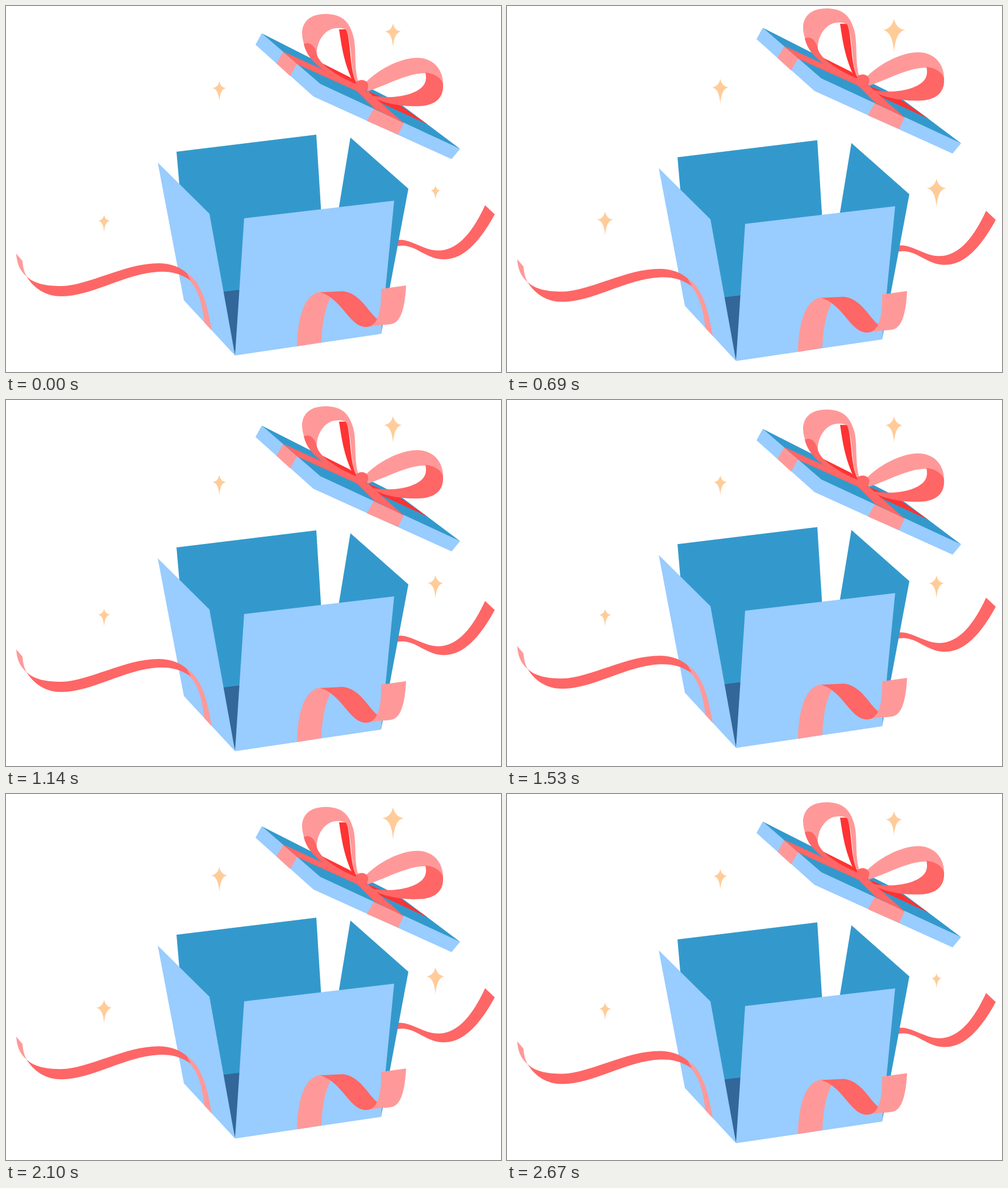
An HTML page with a canvas that plays this animation: 871 by 643 pixels, repeating every 2.7 s.

```html
<!DOCTYPE html>
<html lang="en">
<head>
<meta charset="utf-8">
<title>Gift box</title>
<style>
  html, body { margin: 0; width: 100%; height: 100%; overflow: hidden; background: #fff; }
  canvas { display: block; }
</style>
</head>
<body>
<canvas id="stage" width="871" height="643"></canvas>
<script>
const ctx = document.getElementById('stage').getContext('2d');
const LOOP = 2700;
const SWING = 10;
const SKY = '#99ccff', BLUE = '#3399cc', NAVY = '#336699';
const PINK = '#ff9999', CORAL = '#ff6666', RED = '#ff3333', GOLD = '#ffcc99';

const shape = (color, d) => ({ color, path: new Path2D(d) });

const box = [
  // right streamer, behind the box
  shape(CORAL, 'M685 412C700 408 712 415 735 424C785 445 818 404 843 350L860 366C825 430 795 446 768 445C740 444 722 421 697 421L685 422Z'),
  // back, right side and floor
  shape(BLUE, 'M300 256L546 226L562 480L415 499L322 510Z'),
  shape(BLUE, 'M606 231L708 321L660 576L570 450Z'),
  shape(NAVY, 'M374 503L415 498L403 614Z'),
  // left side and front
  shape(SKY, 'M267 275L358 365L403 614L313 517Z'),
  shape(SKY, 'M419 373L683 342L660 576L403 614Z'),
  // left streamer
  shape(PINK, 'M18 435L29 448C30 460 32 468 37 476C24 465 19 452 18 435Z'),
  shape(PINK, 'M312 466C340 478 353 515 362 570L349 556C346 528 339 496 321 480Z'),
  shape(CORAL, 'M36 475C50 488 70 492 98 492C145 491 210 452 268 452C290 452 307 459 318 469L325 482C306 470 290 466 268 467C210 470 150 510 98 510C70 510 50 497 36 475Z'),
  // front curl
  shape(PINK, 'M512 598C513 545 526 503 556 502L574 508C562 525 556 558 555 591Z'),
  shape(PINK, 'M660 497L704 491C702 530 695 553 681 558C670 561 655 559 636 564C655 560 661 535 660 497Z'),
  shape(CORAL, 'M553 503L592 501C622 503 637 537 653 550C648 560 641 564 633 564C604 563 592 515 553 503Z')
];

const lid = [
  shape(SKY, 'M450 48L439 68L541 159L784 269L799 251L553 137Z'),
  shape(PINK, 'M488 80L476 101L500 123L512 102Z'),
  shape(PINK, 'M648 179L635 202L690 226L700 205Z'),
  shape(BLUE, 'M450 48L691 170L799 251L553 137Z'),
  // bands across the top
  shape(RED, 'M553 99L605 125L637 152L618 148Z'),
  shape(RED, 'M640 151L691 173L742 208L640 161Z'),
  shape(CORAL, 'M488 80L630 145L625 153L512 102Z'),
  shape(CORAL, 'M648 180L700 206L637 150L617 149Z'),
  // right loop
  shape(PINK, 'M633 134C652 115 690 91 725 91C754 92 770 114 769 139L738 118C705 118 668 140 636 150Z'),
  shape(CORAL, 'M738 117C755 118 767 128 769 137C771 165 750 176 725 176C690 177 662 170 638 157C670 162 690 160 705 156C730 149 743 138 738 117Z'),
  // left loop
  shape(RED, 'M586 41L599 41C608 70 604 110 617 136L609 130C593 95 590 65 586 41Z'),
  shape(PINK, 'M621 136C611 110 618 72 610 49C602 22 585 14 562 14C535 14 521 28 521 48C521 56 523 62 525 70L547 88C545 62 562 40 580 39C590 38 597 40 599 43C610 70 605 108 616 134Z'),
  shape(CORAL, 'M524 67C535 61 544 71 547 85C551 101 578 121 616 137L622 148C578 127 532 104 524 67Z'),
  // knot
  shape(CORAL, 'M617 133C623 128 634 129 637 137C639 146 632 155 623 153C615 149 613 140 617 133Z')
];

const sparkShape = new Path2D('M0 -.5Q.06 -.2 .335 -.16Q.045 -.125 0 .5Q-.045 -.125 -.335 -.16Q-.06 -.2 0 -.5Z');

// size is the height at full scale; edge and middle are the scales at 0 and half a loop
const sparks = [
  { x: 681, y: 51.7, size: 59.5, edge: .7, middle: .7 },
  { x: 375.3, y: 150, size: 44.5, edge: .8, middle: .7 },
  { x: 755.7, y: 328.3, size: 51, edge: .5, middle: .7 },
  { x: 172.6, y: 382.3, size: 42.5, edge: .72, middle: .62 }
];

function drawGroup(shapes, dy) {
  ctx.save();
  ctx.translate(0, dy);
  for (const { color, path } of shapes) {
    ctx.fillStyle = color;
    ctx.fill(path);
  }
  ctx.restore();
}

function drawSpark({ x, y, size, edge, middle }, phase) {
  const low = phase < .25 || phase > .75 ? edge : middle;
  const rise = 1 - Math.abs((phase * 2) % 1 * 2 - 1);
  const scale = size * (low + (1 - low) * rise);
  ctx.save();
  ctx.translate(x, y);
  ctx.scale(scale, scale);
  ctx.fillStyle = GOLD;
  ctx.fill(sparkShape);
  ctx.restore();
}

// linear swing: 0, 1, 0, -1, 0 over one loop
const triangle = phase => 1 - Math.abs(((phase + .25) % 1) * 4 - 2);

function draw(time) {
  const phase = (time % LOOP) / LOOP;
  const dy = SWING * triangle(phase);
  ctx.fillStyle = '#fff';
  ctx.fillRect(0, 0, 871, 643);
  drawGroup(box, dy);
  drawGroup(lid, -dy);
  for (const spark of sparks) drawSpark(spark, phase);
}

const start = performance.now();
function tick() {
  draw(Math.max(0, performance.now() - start));
  requestAnimationFrame(tick);
}
tick();
</script>
</body>
</html>
```
